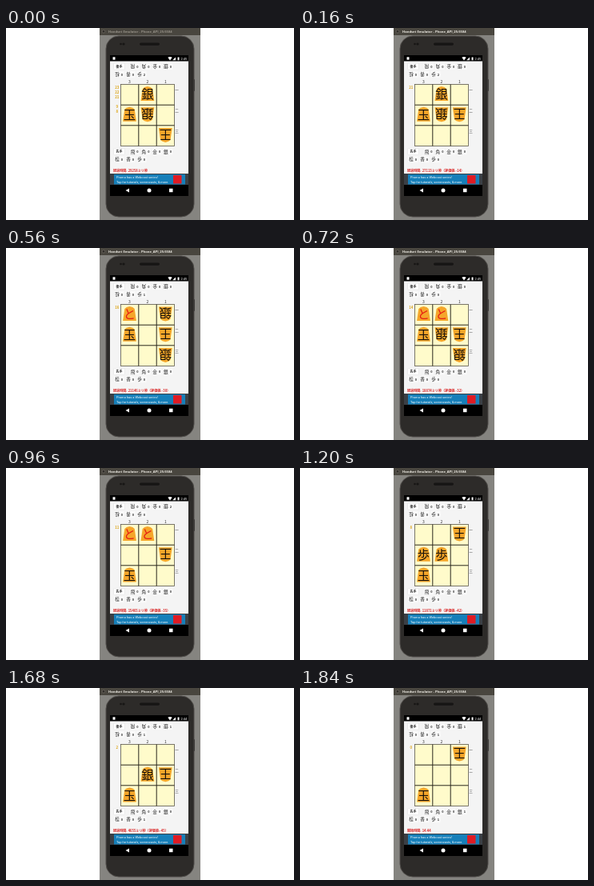
These frames come from a looping animation (360 by 240 pixels, 1.92 s). An HTML page:

```html
<!DOCTYPE html>
<html lang="ja">
<head>
<meta charset="utf-8">
<style>
html, body { margin: 0; width: 100%; height: 100%; overflow: hidden; background: #fff; }
svg { display: block; width: 360px; height: 240px; }
text { font-family: "Noto Sans CJK JP", "Noto Sans CJK", "Noto Sans", sans-serif; }
.latin { font-family: Roboto, "Open Sans", sans-serif; }
#title { font-family: "Open Sans", sans-serif; font-weight: 700; }
</style>
</head>
<body>
<svg viewBox="0 0 360 240">
  <rect x="117" width="126" height="240" fill="#858480"/>
  <rect x="117" width="126" height="9" fill="#49463f"/>
  <circle cx="122" cy="4.3" r="1.8" fill="#2e2c28" stroke="#77716a" stroke-width=".6"/>
  <text id="title" x="128" y="6" font-size="4.15">Handset Emulator - Phone_API_25:5584</text>

  <rect x="233" y="64" width="3" height="15" rx="1" fill="#2b2928"/>
  <rect x="125" y="10" width="110" height="226" rx="16" fill="#2d2b29" stroke="#504d4a"/>
  <rect x="167" y="18.5" width="25" height="3.2" rx="1.6" fill="#161514"/>
  <circle cx="143.5" cy="20" r="1.3" fill="#171615"/>
  <circle cx="147" cy="20" r="1.6" fill="#171615"/>
  <rect x="130" y="34" width="98" height="176" fill="#000"/>
  <rect x="130" y="41.5" width="98" height="141" fill="#f4f4f4"/>

  <g fill="#fff">
    <rect x="133.5" y="36.3" width="3" height="3.4"/>
    <path d="M202.3 36.8q2.7-1.6 5.4 0l-2.7 3.6zM212 36.5v3.8h-3.8zM214.6 36.5h1.9v3.8h-1.9z"/>
    <text id="clock" class="latin" x="218.6" y="39.9" font-size="4"/>
  </g>

  <rect x="130" y="182" width="98" height="14" fill="#3b4046"/>
  <rect x="135" y="183" width="89" height="12.5" fill="#167fb9"/>
  <g fill="#fff">
    <text class="latin" x="138" y="188" font-size="4">Promo has a Webcast series!</text>
    <text class="latin" x="138" y="193.7" font-size="3.9">Tap for tutorials, screencasts, &amp; more.</text>
  </g>
  <rect x="209" y="184" width="10.5" height="10.5" fill="#df1b23"/>

  <g fill="#fff">
    <path d="M149.5 203l4.5-2.6v5.2z"/>
    <circle cx="179" cy="203" r="2.5"/>
    <rect x="204" y="200.7" width="4.5" height="4.5"/>
  </g>

  <rect x="143.5" y="70.5" width="67" height="77" fill="#fffbcb" stroke="#5b584b" stroke-width=".8"/>
  <path d="M165.8 70.5v77M188.2 70.5v77M143.5 96.2h67M143.5 121.8h67" fill="none" stroke="#29271d"/>
  <g id="labels"></g>
  <g id="scene"></g>
</svg>
<script>
const STEP = 80, LAST = 23;
const $ = id => document.getElementById(id);

// Upper case belongs to the lower player. Squares are file then rank.
const MOVES = ["S*22", "11-12", "P*32", "p*21", "22-21", "12-21", "P*22", "21-11",
  "32-31+", "11-12", "22-21+", "s*13", "33-32", "s*22", "21-11", "22-11",
  "31-21", "11-22", "21-22", "13-22", "S*21", "12-13"];
// ply, elapsed ms, evaluation
const PROGRESS = [[0, 2270, -46], [4, 7039, -45], [8, 11871, -42], [11, 15465, -35],
  [16, 21146, -30], [21, 27113, -14], [23, 29258, -14]];
const GLYPHS = { K: "玉", k: "王", S: "銀", s: "銀", P: "歩", p: "歩", T: "と" };

const MIDDLE = 'text-anchor="middle"', BOLD = 'font-weight="700"';
const text = (x, y, size, fill, body, extra = MIDDLE) =>
  `<text x="${x}" y="${y}" font-size="${size}" fill="${fill}" ${extra}>${body}</text>`;
const isUpper = piece => piece === piece.toUpperCase();

function play({ board, hand }, move) {
  if (move[1] === "*") {
    board[move.slice(2)] = move[0];
    hand[move[0]]--;
    return;
  }
  const from = move.slice(0, 2), to = move.slice(3, 5);
  const piece = board[from], taken = board[to];
  if (taken) {
    const kind = taken.toUpperCase().replace("T", "P");
    hand[isUpper(piece) ? kind : kind.toLowerCase()]++;
  }
  delete board[from];
  board[to] = move.endsWith("+") ? "T" : piece;
}

function position(ply) {
  const state = { board: { 11: "k", 33: "K" }, hand: { S: 1, s: 1, P: 1, p: 1 } };
  MOVES.slice(0, ply).forEach(move => play(state, move));
  return state;
}

function drawPiece([square, piece]) {
  const x = 154.5 + (3 - square[0]) * 22.4;
  const y = 82.3 + (square[1] - 1) * 25.7;
  const ink = piece === "T" ? "#e51c12" : "#17120a";
  return `<g transform="translate(${x} ${y}) rotate(${isUpper(piece) ? 0 : 180})">
    <path d="M0-9.3Q4.5-8.6 6.2-6.4L8.4 8.8H-8.4L-6.2-6.4Q-4.5-8.6 0-9.3z" fill="#f5a62a"/>
    ${text(0, 5.8, 15.3, ink, GLYPHS[piece], MIDDLE + ' font-weight="500"')}</g>`;
}

function drawHand(y, name, silver, pawn, turn) {
  const counts = { 飛: 0, 角: 0, 金: 0, 銀: silver, 桂: 0, 香: 0, 歩: pawn };
  let out = `<rect x="134.5" y="${y - 4}" width="14" height="8" rx="1" fill="#fff" stroke="#ddd" stroke-width=".5"/>`
    + text(141.5, y + 1.5, 4, "#222", name, `${MIDDLE} ${BOLD}`);
  Object.entries(counts).forEach(([glyph, count], i) => {
    const x = i < 4 ? 158.5 + i * 13.8 : 139 + (i - 4) * 14;
    const cy = i < 4 ? y : y + 9.8;
    out += `<rect x="${x - 3.5}" y="${cy - 4}" width="12" height="8" rx="1" fill="#fafafa"/>`
      + text(0, 2.1, 5.6, "#222", glyph, `${MIDDLE} transform="translate(${x} ${cy}) rotate(${turn})"`)
      + text(x + 6, cy + 1.9, 3.9, "#222", count, `${MIDDLE} ${BOLD}`);
  });
  return out;
}

function progress(ply) {
  const i = Math.max(1, PROGRESS.findIndex(p => p[0] >= ply));
  const a = PROGRESS[i - 1], b = PROGRESS[i];
  const mix = (ply - a[0]) / (b[0] - a[0]);
  return [1, 2].map(k => Math.round(a[k] + (b[k] - a[k]) * mix));
}

function statusText(ply) {
  if (!ply) return "開始時間: 14:44";
  const [ms, score] = progress(ply);
  return `経過時間: ${ms}ミリ秒` + (ply < LAST ? `（評価値:${score}）` : "");
}

function sideNote(ply) {
  const lines = ply < LAST ? [ply] : [23, 22, 21, "", 9, 8];
  return lines.map((line, i) =>
    text(138.8, 76 + i * 6, 4.3, "#dda30c", line, `${MIDDLE} ${BOLD}`)).join("");
}

function draw(ply) {
  const { board, hand } = position(ply);
  $("title").setAttribute("fill", ply === LAST ? "#98938a" : "#f1eee7");
  $("clock").textContent = ply < 10 ? "2:44" : "2:45";
  $("scene").innerHTML = drawHand(48, "後手", hand.s, hand.p, 180)
    + drawHand(154.4, "先手", hand.S, hand.P, 0)
    + Object.entries(board).map(drawPiece).join("")
    + sideNote(ply)
    + text(134, 180, 4.1, "#d92020", statusText(ply), BOLD);
}

$("labels").innerHTML = [..."321"].map((c, i) => text(154.5 + i * 22.4, 69.3, 5, "#333", c)).join("")
  + [..."一二三"].map((c, i) => text(213.5, 79 + i * 26, 4.6, "#333", c)).join("");

let shown = -1;
const start = performance.now();
function tick(now) {
  const ply = LAST - Math.floor(Math.max(0, now - start) / STEP) % (LAST + 1);
  if (ply !== shown) draw(shown = ply);
  requestAnimationFrame(tick);
}
tick(start);
</script>
</body>
</html>
```
